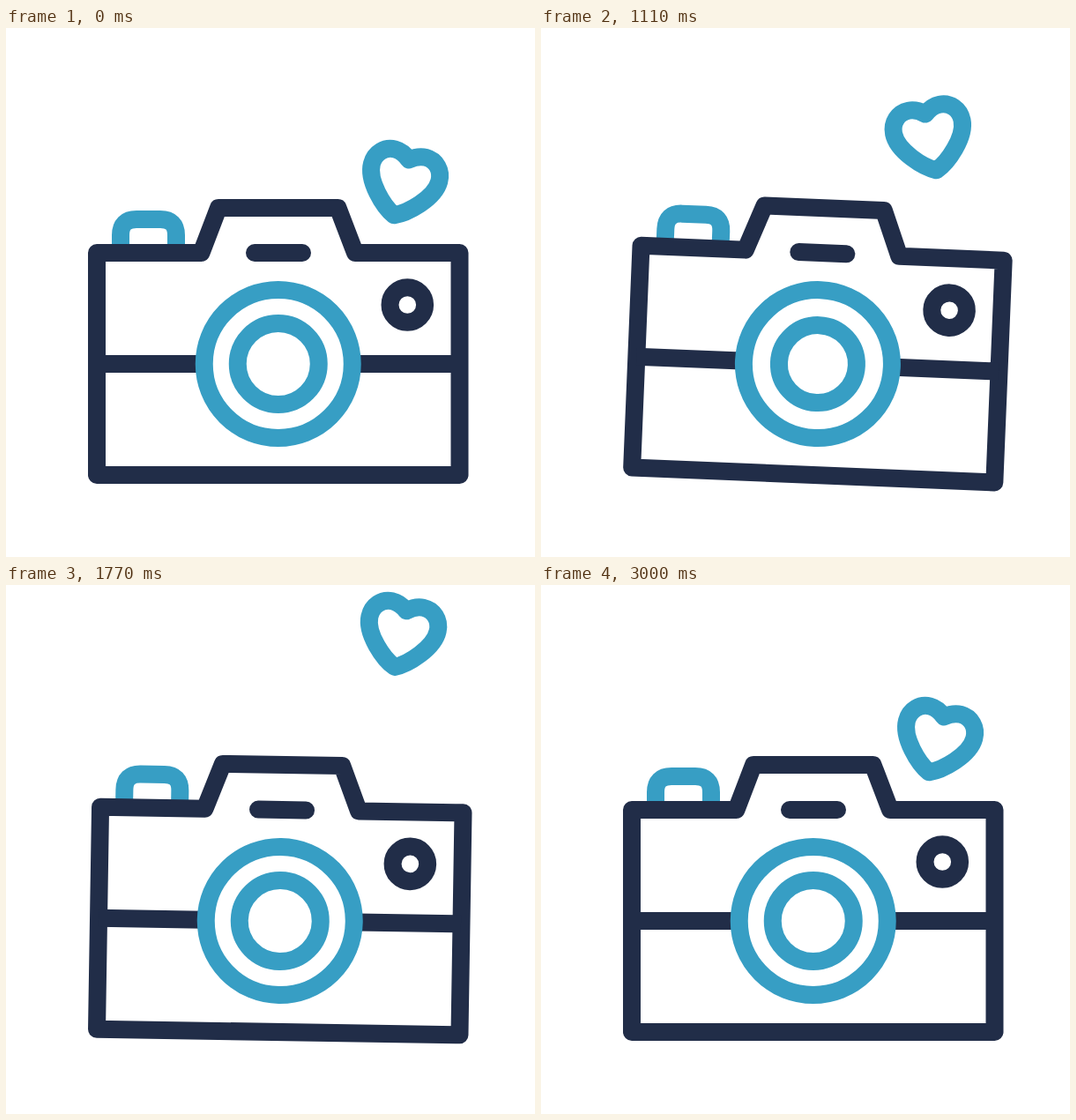
These frames come from a looping animation (600 px wide and 600 px high, 3.03 s). An HTML page:

```html
<!DOCTYPE html>
<html lang="en">
<head>
<meta charset="utf-8">
<title>Camera and heart</title>
<style>
  html, body { margin: 0; width: 100%; height: 100%; overflow: hidden; background: #fff; }
  svg { display: block; width: 100%; height: 100%; }
  g { fill: none; stroke-width: 20; stroke-linejoin: round; }
  .navy { stroke: #212d48; }
  .blue { stroke: #379ec4; }
</style>
</head>
<body>
<svg viewBox="0 0 600 600">
  <g id="camera">
    <path id="button" class="blue" d="M130 250V235Q130 217 148 217H175Q193 217 193 235V250"/>
    <g class="navy">
      <path d="M103 255H221.500L241 204H376.500L396 255H514.500V507H103Z"/>
      <path d="M103 381H222M396 381H514"/>
      <path d="M282 255H336" stroke-linecap="round"/>
      <circle cx="455.300" cy="314" r="19.800"/>
    </g>
    <g class="blue">
      <circle cx="308.750" cy="381" r="84"/>
      <circle id="lens" cx="308.750" cy="381" r="46"/>
    </g>
  </g>
  <g id="heart" class="blue">
    <path d="M0-29C6-34 12-36.500 18-36.500C30-36.500 39.500-27 39.500-14C39.500 6 14 30 0 36C-14 30-39.500 6-39.500-14C-39.500-27-30-36.500-18-36.500C-12-36.500-6-34 0-29Z"/>
  </g>
</svg>
<script>
  const LOOP = 3030, STEP = 30;
  const [camera, button, lens, heart] =
    ['camera', 'button', 'lens', 'heart'].map(id => document.getElementById(id));

  // Keys are [time, value] pairs, eased in and out between neighbours.
  function track(t, ...keys) {
    if (t <= keys[0][0]) return keys[0][1];
    for (let i = 1; i < keys.length; i++) {
      const [t0, a] = keys[i - 1], [t1, b] = keys[i];
      if (t < t1) {
        const u = (t - t0) / (t1 - t0);
        return a + (b - a) * u * u * (3 - 2 * u);
      }
    }
    return keys[keys.length - 1][1];
  }

  function draw(t) {
    const tilt = track(t, [900, 0], [1200, 3], [1500, -2], [1800, 1], [2100, 0]);
    camera.setAttribute('transform', `rotate(${tilt} 308.75 507)`);

    const press = track(t, [0, 0], [600, 1], [900, 0]);
    button.setAttribute('transform', `translate(${press} ${11 * press})`);

    lens.setAttribute('r', track(t, [300, 46], [840, 42], [1380, 46]));

    const home = t >= 2100;
    const x = home ? 0 : track(t, [720, 0], [1470, -15], [1800, -1]);
    const y = home ? 0 : track(t, [540, 0], [1800, -120]);
    const turn = home ? 15 : track(t, [540, 15], [1170, -12], [1800, 12]);
    heart.setAttribute('transform', `translate(${449.5 + x} ${177.5 + y}) rotate(${turn})`);
    heart.setAttribute('opacity', track(t, [1800, 1], [2100, 0], [2700, 0], [3000, 1]));
  }

  const start = performance.now();
  function tick() {
    const t = (performance.now() - start) % LOOP;
    draw(Math.floor(t / STEP) * STEP);
    requestAnimationFrame(tick);
  }
  tick();
</script>
</body>
</html>
```
